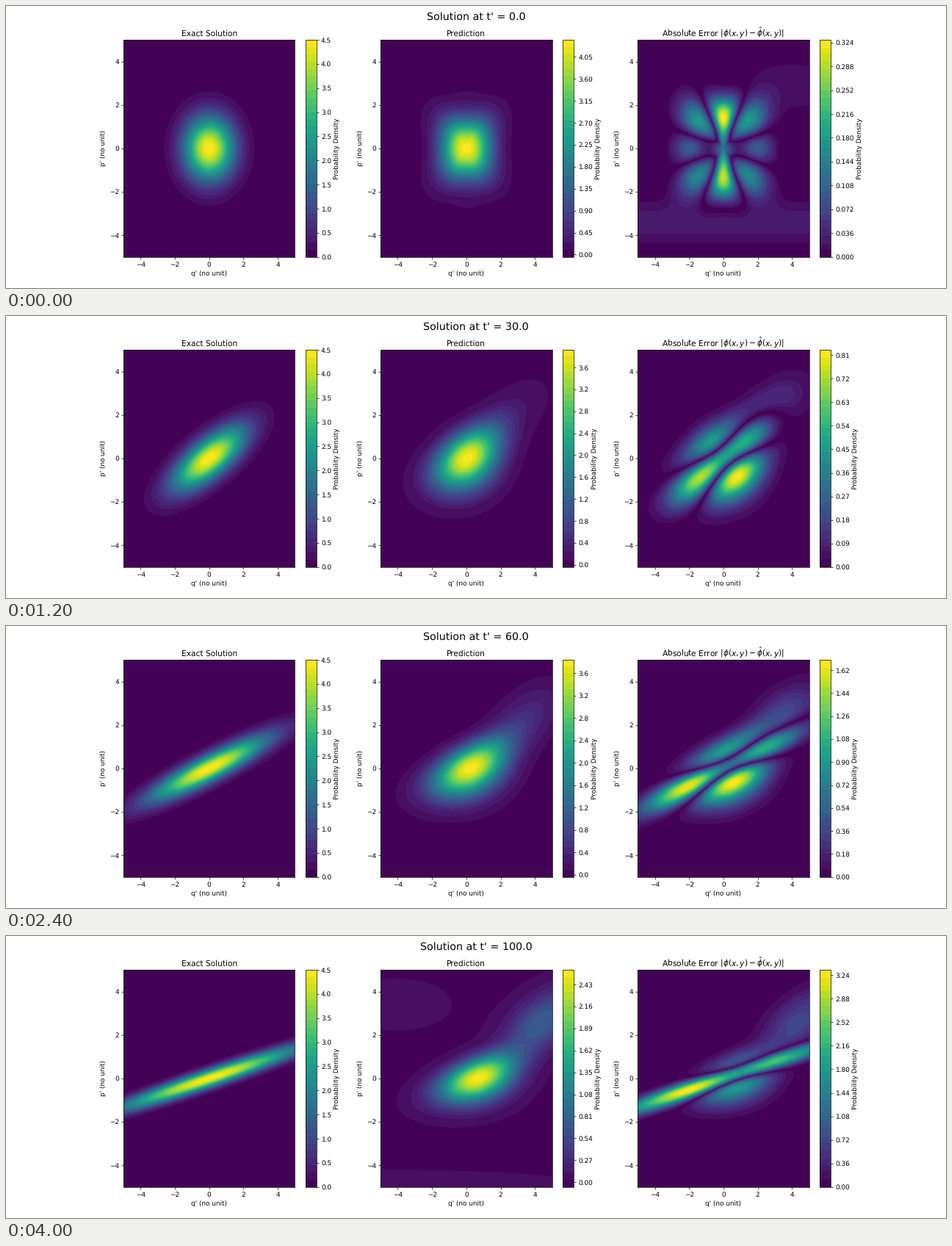
Write a matplotlib script that moves like this. It is 1280 by 384 pixels and loops after 4.2 s.

```python
import numpy as np
import matplotlib.pyplot as plt
from matplotlib.animation import FuncAnimation
from matplotlib.colors import ListedColormap
from matplotlib.ticker import MaxNLocator

plt.rcParams.update({"font.family": "DejaVu Sans", "text.hinting": "no_hinting"})

FRAMES, INTERVAL = 21, 200
T_END = 100.0
SHEAR = 0.035
CMAP = ListedColormap(plt.get_cmap("viridis")(np.linspace(0.004, 0.99, 30)))

# Peak heights at a few times
TIMES = [0, 20, 40, 60, 75, 90, 100]
TOP = [4.38, 4.01, 3.78, 3.82, 3.70, 3.22, 2.59]
ERR_TOP = [0.327, 0.556, 1.09, 1.69, 2.22, 2.87, 3.31]

axis = np.linspace(-5, 5, 121)
Q, P = np.meshgrid(axis, axis)
R, THETA = np.hypot(Q, P), np.arctan2(P, Q)


def bump(amp, q, p, sq, sp, slope=0.0):
    """Gaussian hill, sheared along q."""
    y = P - p
    return amp * np.exp(-0.5 * (((Q - q - slope * y) / sq) ** 2 + (y / sp) ** 2))


def exact(t):
    return bump(4.5, 0, 0, 1, 1, SHEAR * t)


def petals():
    """Eight lobes of alternating sign around a narrow stem."""
    ring = 2.0 - 0.55 * np.sin(THETA) ** 4
    width = 0.6 + 0.25 * np.sin(2 * THETA) ** 2
    wave = np.cos(4 * THETA) + 0.1 - 0.55 * np.cos(2 * THETA)
    lobes = wave * (1 + 0.1 * np.sin(THETA)) * np.exp(-0.5 * ((R - ring) / width) ** 2)
    return 0.18 * lobes + bump(0.12, 0, -0.3, 0.35, 0.7)


def prediction(t, top):
    u, lag = t / T_END, np.tanh(t / 45)
    # Core whose shear falls behind, bends and widens downwards
    mid = 0.67 * u ** 2 + 0.95 * lag * P + 0.15 * lag * P ** 2
    width = (1 + 0.33 * lag) * np.exp(-0.11 * lag * P)
    height = 1.03 - 0.28 * u ** 1.5 - 0.03 * np.exp(-t / 10)
    z = top * np.exp(-0.5 * (((Q - mid) / width) ** 2 + (P / height) ** 2))
    z += bump(0.74 * u, 2 + 2.4 * u, 1.9 + 0.7 * u, 1.2, 1.05, 0.75)

    fade = np.exp(-(t / 17) ** 2)
    z += fade * (exact(0) - z - petals() + bump(0.017, 4.2, 2.9, 3, 1.15))
    z += np.exp(-(t / 30) ** 4) * bump(0.026, 0, -3.4, 20, 0.75)
    z += u ** 5 * (bump(0.043, -4, 3.4, 3.7, 1.4) + bump(0.13, -5, -5.5, 9, 0.75))
    return z * top / z.max()


def panels(t):
    top, err_top = np.interp(t, TIMES, TOP), np.interp(t, TIMES, ERR_TOP)
    true, guess = exact(t), prediction(t, top)
    err = np.abs(true - guess)
    low = np.interp(t, [90, T_END], [-0.01, -0.04])
    return [
        ("Exact Solution", true, 0.0005, 4.495),
        ("Prediction", guess, low, top),
        (r"Absolute Error $|\phi(x,y) - \hat{\phi}(x,y)|$",
         err * err_top / err.max(), 0.0005, err_top),
    ]


fig = plt.figure(figsize=(20, 6), dpi=64)


def draw(i):
    t = T_END * i / (FRAMES - 1)
    fig.clf()
    for ax, (title, z, lo, hi) in zip(fig.subplots(1, 3), panels(t)):
        levels = MaxNLocator(101, min_n_ticks=1).tick_values(lo, hi)
        cs = ax.contourf(Q, P, np.clip(z, lo, hi), levels=levels, cmap=CMAP)
        fig.colorbar(cs, ax=ax, label="Probability Density")
        ax.set(title=title, xlabel="q' (no unit)", ylabel="p' (no unit)")
    fig.suptitle(f"Solution at t' = {t:.1f}", fontsize=16)
    return []


anim = FuncAnimation(fig, draw, frames=FRAMES, init_func=lambda: [],
                     interval=INTERVAL, repeat=True, repeat_delay=0)
plt.show()
```
